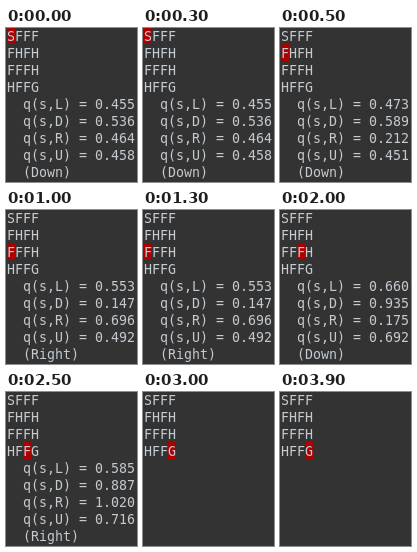
An HTML page that plays this animation: 131x154 px, repeating every 4.5 s.

```html
<!DOCTYPE html>
<html lang="en">
<head>
<meta charset="utf-8">
<title>Grid walk</title>
<style>
  html, body { margin: 0; width: 100%; height: 100%; overflow: hidden; background: #333; }
  svg { display: block; }
  text {
    font: 13.29px "DejaVu Sans Mono", monospace;
    fill: #c3cad0;
    white-space: pre;
  }
</style>
</head>
<body>
<svg id="stage" width="131" height="154" viewBox="0 0 131 154">
  <rect width="131" height="154" fill="#333"/>
  <rect id="cursor" width="8" height="17" fill="#a00"/>
</svg>
<script>
const CELL = 8, LINE = 17, LEFT = 1, TOP = -1, BASE = 14;
const STEP = 500, LOOP = 4500;
const grid = ["SFFF", "FHFH", "FFFH", "HFFG"];
const actions = "LDRU";

// Each step: row, column, action values, chosen move
const steps = [
  [0, 0, [0.455, 0.536, 0.464, 0.458], "Down"],
  [1, 0, [0.473, 0.589, 0.212, 0.451], "Down"],
  [2, 0, [0.553, 0.147, 0.696, 0.492], "Right"],
  [2, 1, [0.488, 0.621, 0.812, 0.178], "Right"],
  [2, 2, [0.660, 0.935, 0.175, 0.692], "Down"],
  [3, 2, [0.585, 0.887, 1.020, 0.716], "Right"],
  [3, 3, [], ""]
];

const stage = document.getElementById("stage");
const cursor = document.getElementById("cursor");

function addLine(row, indent, content = "") {
  const line = document.createElementNS("http://www.w3.org/2000/svg", "text");
  line.setAttribute("x", LEFT + indent * CELL);
  line.setAttribute("y", TOP + row * LINE + BASE);
  line.textContent = content;
  stage.append(line);
  return line;
}

grid.forEach((cells, row) => addLine(row, 0, cells));
const values = [...actions].map((_, i) => addLine(4 + i, 2));
const move = addLine(8, 2);
let shown = -1;

function draw(time) {
  const index = Math.min(Math.floor(time % LOOP / STEP), steps.length - 1);
  if (index === shown) return;
  shown = index;
  const [row, col, q, name] = steps[index];
  cursor.setAttribute("x", LEFT + col * CELL);
  cursor.setAttribute("y", TOP + row * LINE);
  values.forEach((line, i) => {
    line.textContent = q.length ? `q(s,${actions[i]}) = ${q[i].toFixed(3)}` : "";
  });
  move.textContent = name && `(${name})`;
}

const start = performance.now();
function tick() {
  draw(performance.now() - start);
  requestAnimationFrame(tick);
}
tick();
</script>
</body>
</html>
```
